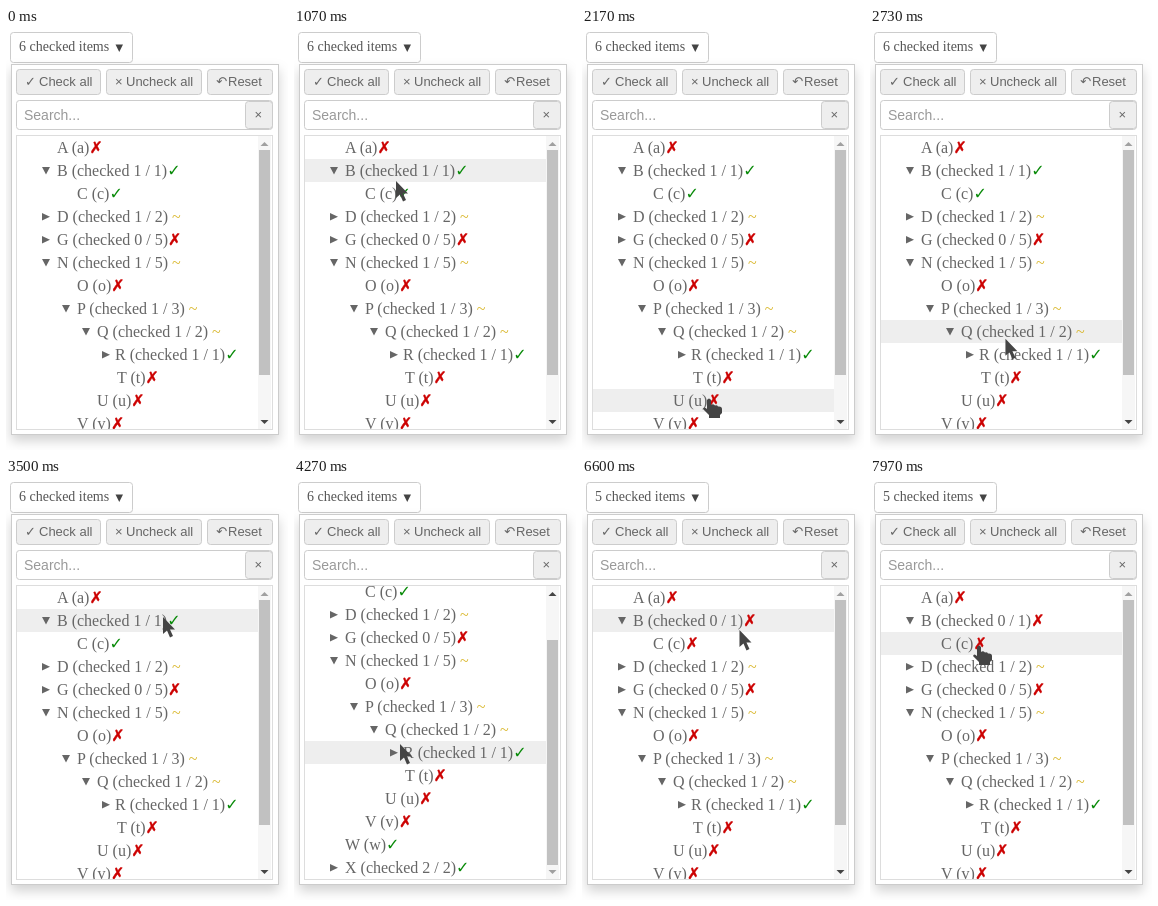
Animation of 282x422 px, one loop 8 s. Source, as an HTML page:

```html
<!DOCTYPE html>
<html lang="en">
<head>
<meta charset="utf-8">
<title>Tree select</title>
<style>
html, body { margin: 0; width: 100%; height: 100%; overflow: hidden; background: #fff; }
svg { display: block; }
text { font-family: "Liberation Serif", "Times New Roman", serif; font-size: 16px; fill: #666; white-space: pre; }
.symbol { font-family: "DejaVu Sans", sans-serif; }
.ui { font-family: "Liberation Sans", Arial, sans-serif; font-size: 13px; fill: #666; }
.box { fill: #fff; stroke: #ccc; }
.button { fill: #eee; stroke: #ccc; }
.panel { filter: drop-shadow(0 6px 6px rgba(0, 0, 0, .175)); }
</style>
</head>
<body>
<svg id="stage" width="282" height="422" viewBox="0 0 282 422"></svg>
<script>
const LOOP = 8000, ROW = 23, TOP = 108, MAX_SCROLL = 52;
const stage = document.getElementById("stage");

function add(parent, tag, attrs = {}, content = "") {
  const node = document.createElementNS("http://www.w3.org/2000/svg", tag);
  for (const key in attrs) node.setAttribute(key, attrs[key]);
  node.textContent = content;
  parent.append(node);
  return node;
}
const rect = (parent, x, y, width, height, attrs) => add(parent, "rect", { x, y, width, height, ...attrs });
const path = (parent, d, attrs) => add(parent, "path", { d, ...attrs });
const label = (x, y, content, attrs) => add(stage, "text", { x, y, ...attrs }, content);
const show = (node, visible) => node.setAttribute("visibility", visible ? "visible" : "hidden");

// Header button and panel
rect(stage, 4.5, 4.5, 122, 30, { rx: 3, class: "box" });
const counter = label(13, 23, "", { style: "font-size:14px;fill:#555" });
path(stage, "M109.5 16.5h7.5l-3.75 7.5z", { fill: "#444" });
rect(stage, 5.5, 36.5, 267, 370, { class: "box panel" });

// Toolbar
function toolButton(x, width, icon, iconClass, textX, caption) {
  rect(stage, x + .5, 41.5, width, 25, { rx: 3, class: "button" });
  label(x + 9, 58, icon, { class: iconClass, style: "font-size:13px" });
  label(textX, 58, caption, { class: "ui" });
}
toolButton(10, 84, "✓", "symbol", 33, "Check all");
toolButton(100, 95, "×", "ui", 120, "Uncheck all");
toolButton(201, 65, "↶", "symbol", 222, "Reset");
rect(stage, 10.5, 72.5, 256, 29, { rx: 3, class: "box" });
label(18, 92, "Search...", { class: "ui", style: "font-size:14px;fill:#999" });
rect(stage, 239.5, 73.5, 27, 27, { rx: 3, class: "button" });
label(248.5, 91, "×", { class: "ui" });

// Tree
rect(stage, 10.5, 107.5, 256, 294, { class: "box", style: "stroke:#ddd" });
const view = add(stage, "svg", { x: 11, y: TOP, width: 241, height: 293 });
const list = add(view, "g");
const highlight = rect(list, 0, 0, 241, ROW, { fill: "#eee" });

const MARKS = { on: ["✓", "#088a08"], off: ["✗", "#c00"], some: [" ~", "#d9b72b"] };
// name, depth, mark, expander, checked counts
const rows = [
  ["A", 0, "off"],
  ["B", 0, "on", "open", "1 / 1"],
  ["C", 1, "on"],
  ["D", 0, "some", "closed", "1 / 2"],
  ["G", 0, "off", "closed", "0 / 5"],
  ["N", 0, "some", "open", "1 / 5"],
  ["O", 1, "off"],
  ["P", 1, "some", "open", "1 / 3"],
  ["Q", 2, "some", "open", "1 / 2"],
  ["R", 3, "on", "closed", "1 / 1"],
  ["T", 3, "off"],
  ["U", 2, "off"],
  ["V", 1, "off"],
  ["W", 0, "on"],
  ["X", 0, "on", "closed", "2 / 2"]
].map(([name, depth, mark, expander, counts], i) => {
  const x = 40 + depth * 20 - (name === "R" ? 2 : 0), mid = i * ROW + 11.5;
  if (expander) {
    const left = 25 + depth * 20;
    path(list, expander === "open" ? `M${left} ${mid - 3.5}h8l-4 7.5z` : `M${left} ${mid - 3.5}v7.5l8-3.75z`,
      { fill: "#666" });
  }
  const text = add(list, "text", { x, y: mid + 5.5 });
  const row = { x: x + 11, text, title: add(text, "tspan"), mark: add(text, "tspan") };
  setRow(row, `${name} (${counts ? "checked " + counts : name.toLowerCase()})`, mark);
  return row;
});
const [, rowB, rowC] = rows;

function setRow(row, title, mark) {
  const [symbol, color] = MARKS[mark];
  row.title.textContent = title;
  row.mark.textContent = symbol;
  row.mark.setAttribute("class", mark === "some" ? "" : "symbol");
  row.mark.style.fill = color;
  row.mark.style.stroke = color;
  row.mark.style.strokeWidth = mark === "off" ? .4 : 0;
}

// Scrollbar
rect(stage, 252, TOP, 13, 293, { fill: "#f6f6f6" });
const thumb = rect(stage, 253, 122, 11, 225, { fill: "#c1c1c1" });
const upArrow = path(stage, "M254.5 118h8l-4-4z");
const downArrow = path(stage, "M254.5 392h8l-4 4z");

// Pointers, with the hot spot near the origin
const cursor = add(stage, "g", { fill: "#444" });
const arrow = path(cursor, "M1 1V18L5 14.5L8 21.5L11 20L8 13.5H13Z");
const hand = path(cursor, "M-2 3Q0 0 2 3V8Q4 6.5 6 8.5Q8 7.5 9 9.5Q13 9 13 12V16L11 18V21H0V18L-6 12Q-5 9-2 12Z");

// time, x, y
const route = [
  [820, 290, 150], [1070, 101, 152], [2170, 127, 369], [2350, 127, 369], [3500, 156, 138],
  [4270, 105, 265], [5370, 36, 147], [5870, 41, 147], [6100, 167, 145], [6330, 167, 145],
  [7100, 130, 166], [7300, 130, 166], [7970, 109, 166], [LOOP, 109, 166]
];
function ease(t, start, end) {
  const p = Math.min(1, Math.max(0, (t - start) / (end - start)));
  return p * p * (3 - 2 * p);
}
function pointerAt(t) {
  const next = Math.max(1, route.findIndex(point => t < point[0]));
  const [start, x0, y0] = route[next - 1], [end, x1, y1] = route[next];
  const p = ease(t, start, end);
  return [x0 + (x1 - x0) * p, y0 + (y1 - y0) * p];
}

let wasChecked;
function setChecked(checked) {
  if (checked === wasChecked) return;
  wasChecked = checked;
  const mark = checked ? "on" : "off";
  counter.textContent = `${checked ? 6 : 5} checked items`;
  setRow(rowB, `B (checked ${checked ? 1 : 0} / 1)`, mark);
  setRow(rowC, "C (c)", mark);
}

function draw(t) {
  setChecked(t < 6330);
  const scroll = MAX_SCROLL * (ease(t, 3950, 4080) - ease(t, 4900, 5030));
  list.setAttribute("transform", `translate(0 ${-scroll})`);
  thumb.setAttribute("y", 122 + scroll * 40 / MAX_SCROLL);
  upArrow.setAttribute("fill", scroll > 0 ? "#444" : "#a0a0a0");
  downArrow.setAttribute("fill", scroll < MAX_SCROLL ? "#444" : "#a0a0a0");

  const [x, y] = pointerAt(t), present = t >= route[0][0];
  const inside = present && x > 11 && x < 252 && y >= TOP && y < 401;
  const index = Math.floor((y - TOP + scroll) / ROW);
  const row = inside && rows[index];
  show(highlight, row);
  highlight.setAttribute("y", index * ROW);

  let clickable = false;
  if (row) {
    const end = row.x + row.text.getComputedTextLength();
    clickable = (x >= row.x - 16 && x <= row.x - 6) || (x >= end - 13.5 && x <= end);
  }
  cursor.setAttribute("transform", `translate(${x} ${y})`);
  show(arrow, present && !clickable);
  show(hand, present && clickable);
}

const begin = performance.now();
function tick() {
  draw((performance.now() - begin) % LOOP);
  requestAnimationFrame(tick);
}
tick();
</script>
</body>
</html>
```
